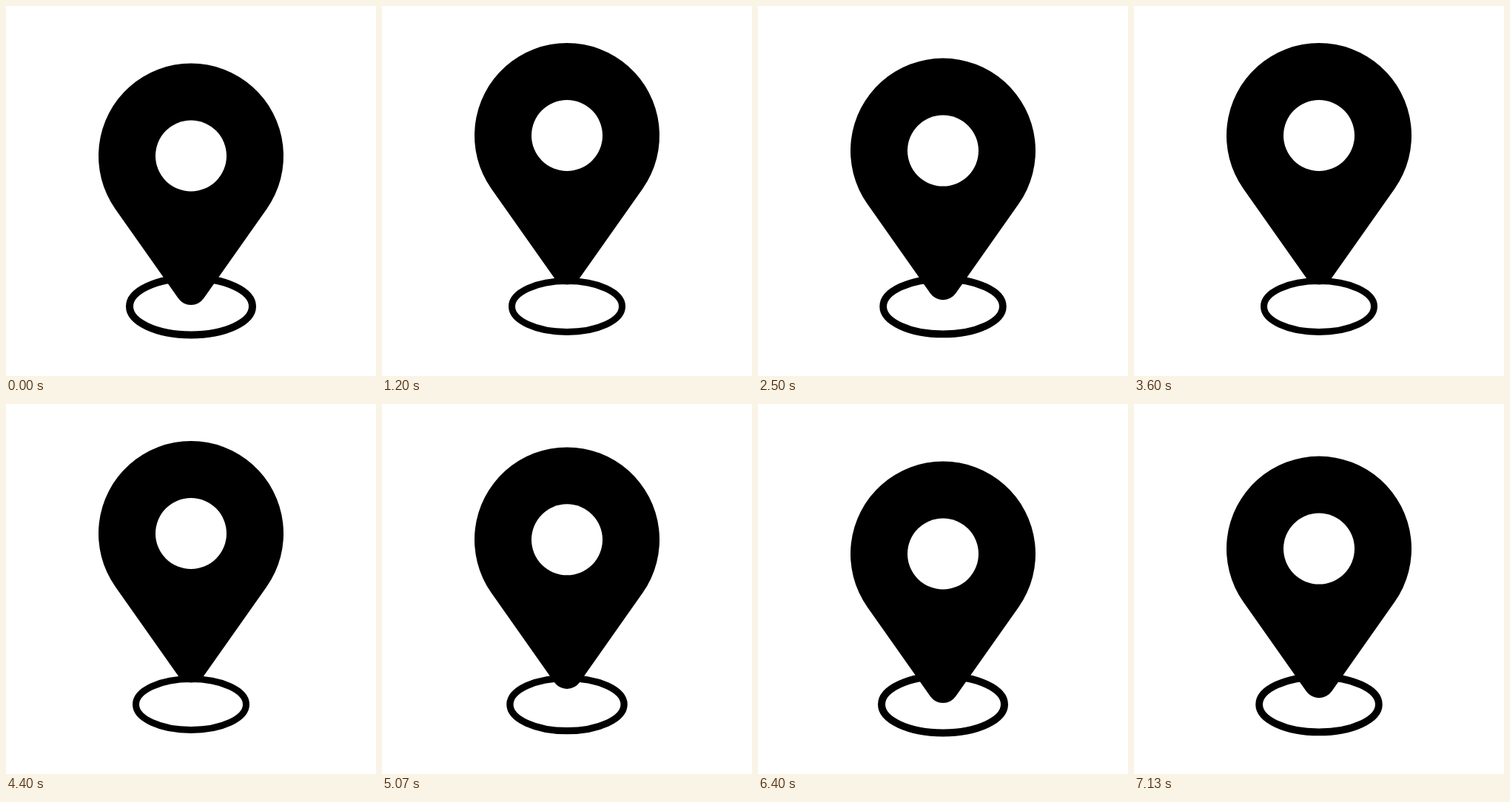
These frames come from a looping animation (500x500 px, 7.21 s). An HTML page:

```html
<!DOCTYPE html>
<html lang="en">
<head>
<meta charset="utf-8">
<title>Bouncing map pin</title>
<style>
  html, body { margin: 0; width: 100%; height: 100%; overflow: hidden; background: #fff; }
  svg { display: block; width: 100%; height: 100%; }
</style>
</head>
<body>
<svg viewBox="0 0 500 500">
  <g id="ring">
    <ellipse rx="74.5" ry="34.5" fill="none" stroke="#000" stroke-width="9"/>
  </g>
  <g id="pin">
    <path d="M-102.2 72A125 125 0 1 1 102.2 72L17.2 192.6A21 21 0 0 1 -17.2 192.6Z"/>
    <circle r="48" fill="#fff"/>
  </g>
</svg>
<script>
  const LOOP = 7210, BOUNCE = 800, BOUNCES = 9, POSES = 10;
  const pin = document.getElementById('pin');
  const ring = document.getElementById('ring');

  // Poses are evenly spaced, but each appears on the next 1/30 s tick.
  const startOf = k => Math.round(Math.ceil(k * 2.4) * 10 / 3) * 10;

  function poseAt(time) {
    const t = time < BOUNCE * BOUNCES ? time % BOUNCE : BOUNCE - 1;
    let k = POSES - 1;
    while (k > 0 && startOf(k) > t) k--;
    return k;
  }

  function draw() {
    const k = poseAt(performance.now() % LOOP);
    const drop = Math.pow(Math.abs(1 - 2 * k / POSES), 1.3);
    pin.setAttribute('transform', `translate(250 ${175 + 27.5 * drop})`);
    ring.setAttribute('transform', `translate(250 406) scale(${1 + 0.114 * drop})`);
    requestAnimationFrame(draw);
  }
  draw();
</script>
</body>
</html>
```
